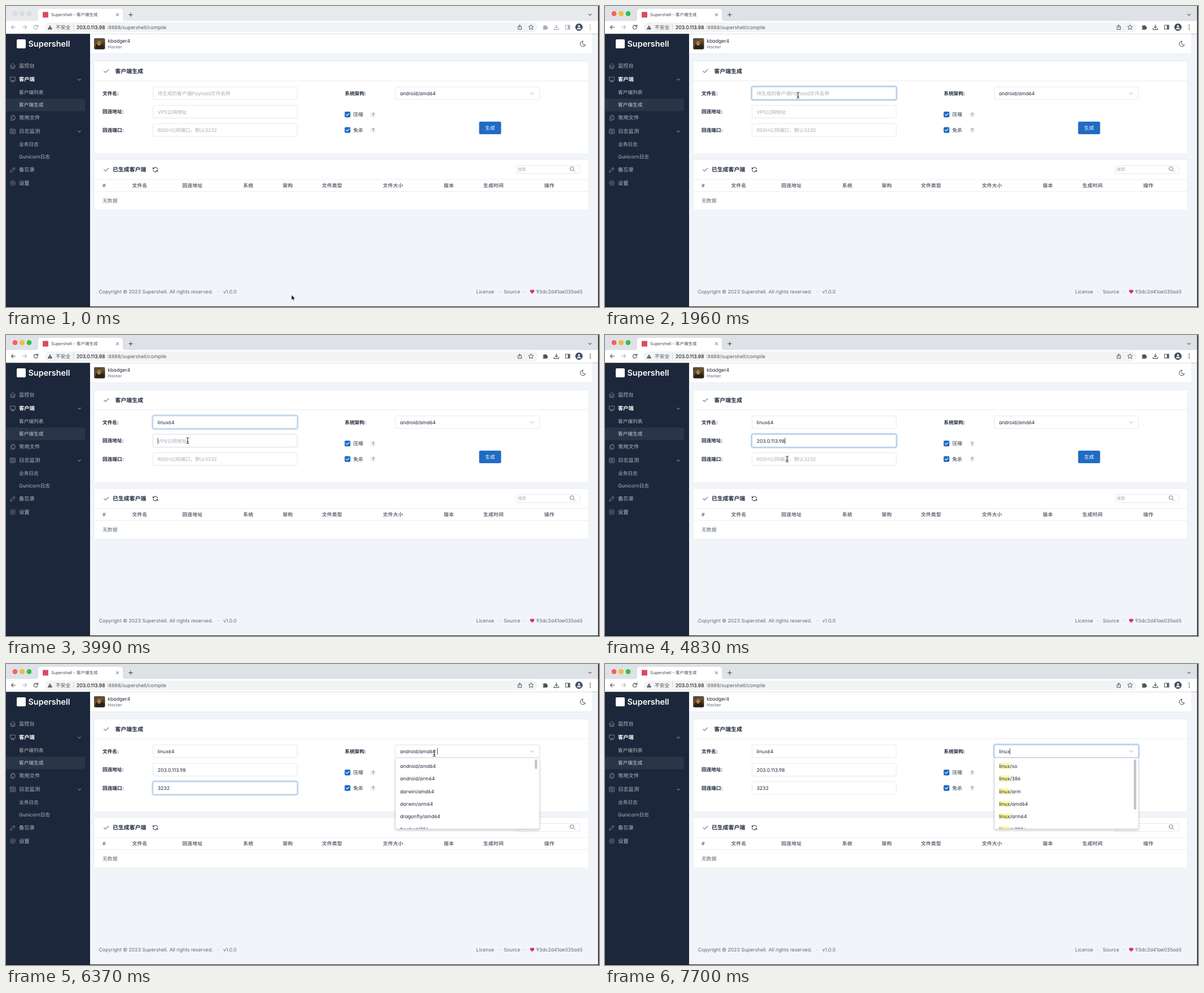
An HTML page that plays this animation: 1051x533 px, repeating every 8000 ms.

```html
<!DOCTYPE html>
<html lang="zh-CN">
<head>
<meta charset="utf-8">
<title>Supershell - 客户端生成</title>
<style>
html, body { margin: 0; width: 100%; height: 100%; overflow: hidden; background: #15171c; }
svg { display: block; }
text {
  font-family: Inter, "Noto Sans CJK SC", "Noto Sans CJK", sans-serif;
  font-feature-settings: "cv03", "cv04", "cv11";
  text-rendering: geometricPrecision;
  white-space: pre;
}
.plain { font-feature-settings: normal; }
</style>
</head>
<body>
<svg id="stage" width="1051" height="533" viewBox="0 0 1051 533"></svg>
<script>
const LOOP = 8000, STEP = 70;
const INK = '#1d273b', MUTED = '#616876', HINT = '#a8adb5', LINE = '#e6e7e9', BLUE = '#206bc4', SIDE = '#b4b9c2';
const HOST = '203.0.113.98';
const BASE = 8.68;

const ICON = {
  home: 'M5 12H3l9-9 9 9h-2M5 12v7a2 2 0 0 0 2 2h10a2 2 0 0 0 2-2v-7M9 21v-6a2 2 0 0 1 2-2h2a2 2 0 0 1 2 2v6',
  desktop: 'M4 4h16a1 1 0 0 1 1 1v10a1 1 0 0 1-1 1H4a1 1 0 0 1-1-1V5a1 1 0 0 1 1-1zM7 20h10M9 16v4M15 16v4',
  files: 'M15 3v4a1 1 0 0 0 1 1h4M18 17h-7a2 2 0 0 1-2-2V5a2 2 0 0 1 2-2h4l5 5v7a2 2 0 0 1-2 2zM16 17v2a2 2 0 0 1-2 2H7a2 2 0 0 1-2-2V9a2 2 0 0 1 2-2h2',
  list: 'M5 4h14a2 2 0 0 1 2 2v12a2 2 0 0 1-2 2H5a2 2 0 0 1-2-2V6a2 2 0 0 1 2-2zM7 8h10M7 12h10M7 16h10',
  pencil: 'M4 20h4L18.5 9.5a2.8 2.8 0 0 0-4-4L4 16v4M13.5 6.5l4 4',
  gear: gear(),
  moon: 'M12 3h.4a7.5 7.5 0 0 0 7.9 12.4A9 9 0 1 1 12 3z',
  check: 'M5 12l5 5L20 7',
  down: 'M6 9l6 6 6-6',
  refresh: 'M20 11A8.1 8.1 0 0 0 4.5 9M4 5v4h4M4 13a8.1 8.1 0 0 0 15.5 2m.5 4v-4h-4',
  search: 'M3 10a7 7 0 1 0 14 0a7 7 0 1 0-14 0M21 21l-6-6',
  heart: 'M19.5 12.6L12 20l-7.5-7.4A5 5 0 1 1 12 6a5 5 0 1 1 7.5 6.6z',
  back: 'M20 12H4M11 5l-7 7 7 7',
  next: 'M4 12h16M13 5l7 7-7 7',
  reload: 'M19 13a7.5 7.5 0 1 1-2.2-6.3L19.500 9M20 3v6h-6',
  share: 'M8 9H5v12h14V9h-3M12 15V3M8 7l4-4 4 4',
  star: 'M12 17.8l-6.2 3.2 1.2-6.9-5-4.8 6.900-1L12 2l3.1 6.300 6.900 1-5 4.800 1.200 6.900z',
  puzzle: 'M4 7h5a3 3 0 1 1 6 0h5v5a3 3 0 1 1 0 6v3H4v-5a2.500 2.500 0 1 0 0-5z',
  save: 'M12 3v12M7 10l5 5 5-5M3 16v5h18v-5',
  panel: 'M3 4h18v16H3zM14 4v16M16 4v16M18 4v16',
  plus: 'M12 4v16M4 12h16',
  close: 'M5 5l14 14M19 5L5 19',
};

function gear() {
  let d = '';
  for (let i = 0; i < 64; i++) {
    const a = i * Math.PI / 32, r = 8.3 + 1.1 * Math.cos(a * 8);
    d += (i ? 'L' : 'M') + (12 + r * Math.cos(a)).toFixed(2) + ' ' + (12 + r * Math.sin(a)).toFixed(2);
  }
  return d + 'zM9 12a3 3 0 1 0 6 0a3 3 0 1 0-6 0';
}

// y is the middle of the line
function text(x, y, s, fill = INK, size = BASE, extra = '') {
  return `<text x="${x}" y="${y + size * .36}" font-size="${size}" fill="${fill}" ${extra}>${s}</text>`;
}
const bold = (x, y, s, fill, size, extra = '') => text(x, y, s, fill, size, 'font-weight="600" ' + extra);
function rect(x, y, w, h, fill, r = 0, extra = '') {
  return `<rect x="${x}" y="${y}" width="${w}" height="${h}" rx="${r}" fill="${fill}" ${extra}/>`;
}
function icon(name, x, y, size, color, weight = 1.5, extra = 'fill="none"') {
  const k = size / 24;
  return `<path d="${ICON[name]}" transform="translate(${x - size / 2} ${y - size / 2}) scale(${k})" stroke="${color}" stroke-width="${weight}" stroke-linecap="round" stroke-linejoin="round" ${extra}/>`;
}
const edge = (color = LINE) => `stroke="${color}" stroke-width=".7"`;
const dot = (x, y, r, fill, extra = '') => `<circle cx="${x}" cy="${y}" r="${r}" fill="${fill}" ${extra}/>`;

function browser() {
  let s = rect(0, 0, 1049.5, 27, '#dee1e6', 0, 'id="strip"');
  for (const x of [16, 28.5, 41]) s += dot(x, 13.5, 3.9, '#ddd', 'class="light" stroke-width=".6"');
  s += '<path d="M52 27q5 0 5-5V10q0-5 5-5H202q5 0 5 5V22q0 5 5 5z" fill="#fff"/>';
  s += rect(0, 26.5, 1049.5, 23, '#fff');
  s += rect(65, 10.5, 10, 10, '#dc4a62', 1);
  s += text(80, 15.5, 'Supershell - 客户端生成', '#45494d', 7.5, 'class="plain"');
  s += icon('close', 197.5, 15.5, 7, '#3c4043', 3) + icon('plus', 221, 15.5, 10, '#3c4043', 2.6);
  s += icon('down', 1035, 15.5, 10, '#3c4043', 2.5);
  s += rect(69, 29.3, 873, 17.2, '#f1f3f4', 8.6);
  s += icon('back', 13, 37.5, 10.5, '#555', 2.5, 'fill="none" class="tool"');
  s += icon('next', 33, 37.5, 10.5, '#b4b6b9', 2.5);
  s += icon('reload', 53, 37.5, 11, '#555', 2.5, 'fill="none" class="tool"');
  s += '<path d="M78 34l4.200 7.400h-8.400z" fill="#4f5357"/>' + rect(77.6, 36.7, .8, 2.2, '#fff') + rect(77.6, 39.5, .8, .8, '#fff');
  s += text(88, 37.7, '不安全', '#4f5357', 8.8) + rect(119, 32.5, .7, 10, '#c4c7ca');
  s += text(125, 37.7, HOST, '#202124', 8.68, 'class="plain" stroke="#202124" stroke-width=".12"');
  s += text(179.3, 37.7, ':8888/supershell/compile', '#5a5e63', 8.68, 'class="plain"');
  s += icon('share', 910.5, 37.5, 10.5, '#4f5357', 2.2) + icon('star', 930.5, 37.5, 10.5, '#4f5357', 2.2);
  s += icon('puzzle', 955.5, 37.5, 10.5, '#555', 1, 'class="tool solid"');
  s += icon('save', 975.5, 37.5, 11, '#555', 2.5, 'fill="none" class="tool"');
  s += icon('panel', 995.5, 37.5, 10.5, '#555', 2.3, 'fill="none" class="tool"');
  s += dot(1015.5, 37.5, 6.5, '#414b5c') + dot(1015.5, 35.7, 2, '#dfe6f0') + '<path d="M1011.700 41.200a3.800 3 0 0 1 7.600 0z" fill="#dfe6f0"/>';
  for (const y of [34, 37.5, 41]) s += dot(1035.5, y, 1, '#555', 'class="tool solid"');
  return s;
}

function sidebar() {
  let s = rect(0, 49.5, 149, 482.500, INK) + rect(0, 164, 140, 22.5, '#2b3548');
  s += rect(19, 59, 16, 16, '#fff', 2) + bold(39.5, 66.5, 'Supershell', '#fff', 14.4, 'class="plain"');
  const main = [['home', 106, '监控台'], ['desktop', 130, '客户端'], ['files', 198, '常用文件'], ['list', 222, '日志监测'], ['pencil', 290, '备忘录'], ['gear', 313.5, '设置']];
  for (const [name, y, label] of main) {
    s += icon(name, 12, y, 12.2, '#9299a5', 1.5);
    s += y === 130 ? bold(23, y, label, '#fff', 9.3) : text(23, y, label, SIDE, 9.3);
  }
  for (const y of [130, 222]) s += icon('down', 130, y + .3, 9.5, '#dde0e5', 2);
  const sub = [[152.7, '客户端列表'], [175.2, '客户端生成'], [244.5, '业务日志'], [267, 'Gunicorn日志']];
  for (const [y, label] of sub) s += text(23, y, label, y === 175.2 ? '#c9cdd4' : SIDE);
  return s;
}

function page() {
  let s = rect(149, 49.5, 900.5, 482.5, '#f1f5f9');
  s += rect(149, 49.5, 890, 35, '#fff') + rect(149, 84.2, 890, .7, LINE);
  s += rect(156, 57, 19.5, 19.5, 'url(#photo)', 2);
  s += '<path d="M158 76.500q1-11 7-13 7 2 8 13z" fill="#2a2118"/><path d="M161 66l4-5 4 5-2 4h-4z" fill="#b07a3c"/>';
  s += text(180.3, 62.3, 'kbadger4') + text(180.3, 72.6, 'Hacker', MUTED, 7.44);
  s += icon('moon', 1022.5, 67, 12.4, INK, 1.7);

  s += rect(156, 97.300, 876.5, 164.5, '#fff', 2, edge()) + rect(156, 132.3, 876.5, .7, LINE);
  s += icon('check', 177.5, 115.3, 13, INK, 1.8) + bold(193.5, 115.300, '客户端生成', INK, 9.92);
  for (const [x, y, label] of [[171, 154.7, '文件名:'], [171, 187.2, '回连地址:'], [171, 219.7, '回连端口:'], [600.5, 154.7, '系统架构:']]) s += bold(x, y, label);
  for (const [y, label] of [[192, '压缩'], [219.5, '免杀']]) {
    s += rect(600.2, y - 5, 10.2, 10.2, BLUE, 2) + icon('check', 605.3, y + .1, 8.5, '#fff', 3.2);
    s += text(615.5, y, label) + dot(650.8, y + .2, 5.3, '#eef1f5') + bold(650.8, y + .2, '?', MUTED, 7.44, 'text-anchor="middle"');
  }
  s += rect(838.500, 204.7, 39, 22.400, BLUE, 2.3) + text(858, 216, '生成', '#fff', BASE, 'text-anchor="middle"');

  s += rect(156, 271.700, 876.5, 89.5, '#fff', 2, edge()) + rect(156, 307, 876.5, .7, LINE) + rect(156, 328, 876.5, .7, LINE);
  s += icon('check', 177.5, 289.8, 13, INK, 1.8) + bold(189, 289.8, '已生成客户端', INK, 9.92) + icon('refresh', 264.7, 289.7, 12.4, INK, 1.9);
  s += rect(904.3, 282.5, 112.5, 14.3, '#fff', 1, edge('#dadee3')) + text(907, 289.500, '搜索', HINT, 7.5) + icon('search', 1004, 289, 11.500, MUTED, 1.8);
  const heads = { 171: '#', 223.5: '文件名', 312.5: '回连地址', 420.5: '系统', 490.5: '架构', 560: '文件类型', 668: '文件大小', 776: '版本', 846: '生成时间', 954: '操作' };
  for (const x in heads) s += bold(x, 318, heads[x], MUTED, BASE, 'letter-spacing=".35"');
  s += text(171, 345, '无数据', MUTED, 8.9);

  const foot = [[164.5, 'Copyright © 2023 Supershell. All rights reserved.'], [375, '·'], [385, 'v1.0.0'], [833.3, 'License'], [872.5, '·'], [882.300, 'Source'], [918, '·'], [939.800, '93dc2d41ae035a65']];
  for (const [x, label] of foot) s += text(x, 506, label, MUTED);
  return s + icon('heart', 932.6, 506, 10, '#d6336c', 1, 'fill="#d6336c"');
}

const fields = [
  { x: 260.5, y: 143.2, on: 1390, off: 3950, hint: '待生成的客户端Payload文件名称',
    keys: [[2100, 'l'], [2310, 'li'], [2520, 'lin'], [2590, 'linu'], [2730, 'linux'], [2870, 'linux6'], [3080, 'linux64']] },
  { x: 260.5, y: 176, on: 3950, off: 4880, hint: 'VPS公网地址', keys: [[4480, HOST]] },
  { x: 260.5, y: 208.5, on: 4880, off: 6335, hint: 'RSSH公网端口，默认3232',
    keys: [[5250, '3'], [5390, '32'], [5600, '323'], [5740, '3232']] },
  { x: 690, y: 143.2, on: 6335, off: LOOP, hint: 'android/amd64', select: true,
    keys: [[7280, 'l'], [7350, 'li'], [7490, 'lin'], [7630, 'linu'], [7700, 'linux']] },
];

function inputs() {
  return fields.map(f => '<g class="field">'
    + rect(f.x - 1.2, f.y - 1.2, 258, 24.800, 'none', 3.4, `class="ring" stroke="${BLUE}" stroke-width="2.4"`)
    + rect(f.x, f.y, 255.6, 22.400, '#fff', 2.4, 'class="box" stroke-width=".8"')
    + text(f.x + 8.2, f.y + 11.5, f.hint, HINT, BASE, 'class="value"')
    + rect(0, f.y + 6, .8, 11, INK, 0, 'class="caret"')
    + (f.select ? icon('down', 932.5, f.y + 11.500, 12, '#7d8794', 1.4) : '') + '</g>').join('');
}

const ROWS = ['android/amd64', 'android/arm64', 'darwin/amd64', 'darwin/arm64', 'dragonfly/amd64', 'freebsd/386'];
const FOUND = ['so', '386', 'arm', 'amd64', 'arm64', 's390x'].map(a => 'linux/' + a);

function menu() {
  let s = '<g id="menu">' + rect(690.5, 166.3, 254.500, 125.5, '#fff', 2, `filter="url(#drop)" ${edge('#dfe2e6')}`);
  s += '<g clip-path="url(#fold)">';
  ROWS.forEach((row, i) => {
    const y = 180.5 + i * 22.45;
    s += rect(698.5, y - 5.7, 0, 11.2, '#fff8a9', .6, 'class="mark"') + text(698.5, y, row, INK, BASE, 'class="row"');
  });
  return s + '</g>' + rect(937.2, 169, 4.300, 17, '#c4c4c6', 2.100, 'id="thumb"') + '</g>';
}

const cursors = '<path id="arrow" d="M0 0V9.200L2.100 7.300 3.600 10.600 5.100 9.900 3.700 6.800H6.500z" fill="#000" stroke="#fff" stroke-width=".7"/>'
  + '<g id="beam" fill="none" stroke-linecap="round"><path d="M-2-5.200Q0-5.200 0-4Q0-5.200 2-5.200M0-4V4M-2 5.200Q0 5.200 0 4Q0 5.200 2 5.200M-1.300 1.800H1.300" stroke="#fff" stroke-width="2" opacity=".7"/>'
  + '<path d="M-2-5.200Q0-5.200 0-4Q0-5.200 2-5.200M0-4V4M-2 5.200Q0 5.200 0 4Q0 5.200 2 5.200M-1.300 1.800H1.300" stroke="#111" stroke-width=".9"/></g>';

const stage = document.getElementById('stage');
stage.innerHTML = `<defs>
  <linearGradient id="photo" x2=".6" y2="1"><stop stop-color="#3b4a55"/><stop offset=".5" stop-color="#6d5130"/><stop offset="1" stop-color="#2c2219"/></linearGradient>
  <filter id="drop" x="-5%" y="-5%" width="110%" height="120%"><feDropShadow dx="0" dy="2" stdDeviation="2.2" flood-color="#1d273b" flood-opacity=".28"/></filter>
  <clipPath id="fold"><rect x="690" y="166" width="255" height="125.8"/></clipPath></defs>`
  + rect(0, 0, 1051, 533, '#15171c') + browser() + page() + sidebar() + inputs() + menu() + cursors;

const $ = id => document.getElementById(id);
const all = q => [...stage.querySelectorAll(q)];
const set = (el, attrs) => { for (const k in attrs) el.setAttribute(k, attrs[k]); };
const show = (el, yes) => set(el, { visibility: yes ? 'visible' : 'hidden' });
const parts = all('.field').map(g => ['ring', 'box', 'value', 'caret'].map(c => g.querySelector('.' + c)));
const lights = all('.light'), tools = all('.tool'), rows = all('.row'), marks = all('.mark');

const clamp = v => Math.max(0, Math.min(1, v));
const ease = v => v * v * (3 - 2 * v);
const ramp = (t, a, d) => ease(clamp((t - a) / d));
const mix = (a, b, k) => `rgb(${a.map((v, i) => Math.round(v + (b[i] - v) * k))})`;

// start time, end time, x, y
const moves = [[0, 610, 340, 158.5], [640, 770, 342, 158], [3360, 3430, 342.500, 160.5], [3500, 3850, 322, 187], [4550, 4850, 322.800, 220.2], [5790, 6270, 759, 158.5]];

function pointer(t) {
  let x = 506, y = 511.500;
  for (const [a, b, nx, ny] of moves) {
    const k = ramp(t, a, b - a);
    x += (nx - x) * k;
    y += (ny - y) * k;
  }
  return [x, y];
}

function drawField(f, t, [ring, box, value, caret]) {
  const glow = ramp(t, f.on, 180) * (1 - ramp(t, f.off, 180));
  const typed = f.keys.filter(k => k[0] <= t).pop();
  const label = typed ? typed[1] : f.hint;
  set(ring, { 'stroke-opacity': .25 * glow });
  set(box, { stroke: mix([223, 226, 230], [144, 181, 226], glow) });
  set(value, { fill: typed || f.select ? INK : HINT });
  if (value.textContent !== label) value.textContent = label;
  const last = typed ? typed[0] : f.on;
  const lit = t >= f.on && t < f.off && (t - last) % 1120 < 560;
  show(caret, lit);
  if (lit) {
    const end = typed || f.select ? value.getComputedTextLength() : 0;
    set(caret, { x: f.x + 8.2 + end + (f.select && !typed ? 2.5 : 0) });
  }
}

function drawMenu(t) {
  show($('menu'), t >= 6335);
  const n = fields[3].keys.filter(k => k[0] <= t).length;
  rows.forEach((row, i) => {
    const label = n ? FOUND[i] : ROWS[i];
    if (row.textContent !== label) row.textContent = label;
    set(marks[i], { width: n ? row.getSubStringLength(0, n) : 0 });
  });
  set($('thumb'), { height: n ? 89 : 17 });
}

function draw(ms) {
  const t = Math.floor((ms % LOOP + .5) / STEP) * STEP;
  const active = t >= 770;
  set($('strip'), { fill: active ? '#dee1e6' : '#e7eaed' });
  lights.forEach((el, i) => set(el, active
    ? { fill: ['#fe5f57', '#febc2e', '#28c840'][i], stroke: ['#e0443e', '#dea123', '#1aab29'][i] }
    : { fill: '#dcdddf', stroke: '#c6c8cb' }));
  for (const el of tools) {
    const color = active ? '#4f5357' : '#a9acb0';
    set(el, el.classList.contains('solid') ? { fill: color } : { stroke: color });
    if (el.tagName === 'path') set(el, { stroke: color });
  }
  fields.forEach((f, i) => drawField(f, t, parts[i]));
  drawMenu(t);

  const [x, y] = pointer(t);
  const hidden = (t >= 2100 && t < 3430) || t >= 7280;
  const beam = t >= 840 && (x < 517 || x > 690);
  show($('arrow'), !hidden && !beam);
  show($('beam'), !hidden && beam);
  for (const id of ['arrow', 'beam']) set($(id), { transform: `translate(${x} ${y})` });
}

let start;
function tick(now) {
  start ??= now;
  draw(now - start);
  requestAnimationFrame(tick);
}
draw(0);
requestAnimationFrame(tick);
</script>
</body>
</html>
```
